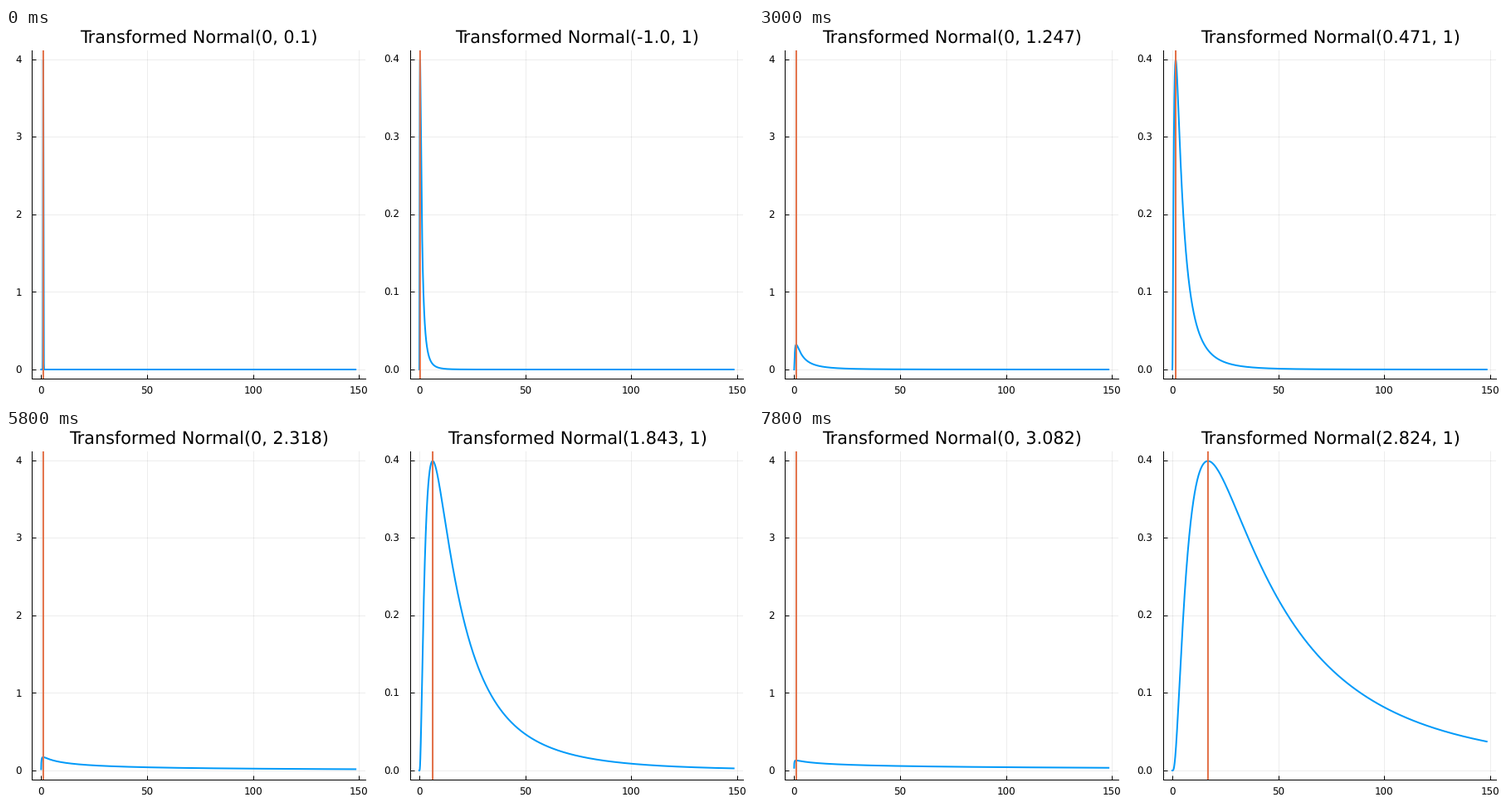
A matplotlib script that plays this animation: 900x450 px, repeating every 8000 ms.

```python
import numpy as np
import matplotlib.pyplot as plt
from matplotlib.animation import FuncAnimation

W, H, DPI = 900, 450, 100
PT = 72 / DPI                      # points per pixel
STEPS, FRAMES, INTERVAL = 51, 40, 200
TICK, TITLE = 11.9, 20.8           # font sizes in pixels
DIGIT, DOT = 0.636, 0.318          # glyph advances in em
BLUE, ORANGE = "#009af9", "#e26f46"

plt.rcParams.update({"font.family": "DejaVu Sans", "text.hinting": "no_hinting"})

t = np.linspace(-5, 5, 1501)
x = np.exp(t)
pad = 0.03 * (x[-1] - x[0])

fig = plt.figure(figsize=(W / DPI, H / DPI), dpi=DPI, facecolor="white")


def normal_pdf(mu, sigma):
    return np.exp(-0.5 * ((t - mu) / sigma) ** 2) / (sigma * np.sqrt(2 * np.pi))


def put(px, py, text, size, **kw):
    return fig.text(px / W, 1 - py / H, text, fontsize=size * PT,
                    va="baseline", **kw)


def advance(label):
    return TICK * sum(DOT if c == "." else DIGIT for c in label)


class Panel:
    left_to_right, top, bottom = 401.5, 27.4, 423.2

    def __init__(self, left, peak, yticks):
        width, height = self.left_to_right, self.bottom - self.top
        ax = fig.add_axes([left / W, 1 - self.bottom / H, width / W, height / H])
        ax.set_xlim(x[0] - pad, x[-1] + pad)
        ax.set_ylim(-0.03 * peak, 1.03 * peak)
        ax.set_xticks([0, 50, 100, 150])
        ax.set_yticks([float(s) for s in yticks])
        ax.tick_params(direction="in", length=5 * PT, width=PT,
                       labelbottom=False, labelleft=False)
        ax.set_axisbelow(True)
        ax.grid(color="black", alpha=0.07, linewidth=PT)
        ax.spines[["top", "right"]].set_visible(False)
        ax.spines[["left", "bottom"]].set_linewidth(PT)

        for v in (0, 50, 100, 150):
            label = str(v)
            px = left + width * (v - x[0] + pad) / (x[-1] - x[0] + 2 * pad)
            put(px - advance(label) / 2, 441.5, label, TICK)
        for label in yticks:
            frac = (float(label) / peak + 0.03) / 1.06
            py = self.bottom - height * frac
            put(left - 12.2 - advance(label), py + 4.4, label, TICK)

        self.curve, = ax.plot([], [], color=BLUE, lw=2 * PT)
        self.mode = ax.axvline(1, color=ORANGE, lw=2 * PT, snap=False)
        self.title = put(left + width / 2 + 0.9, 18.5, "", TITLE, ha="center")

    def show(self, mu, sigma, args):
        self.curve.set_data(x, normal_pdf(mu, sigma))
        self.mode.set_xdata([np.exp(mu)] * 2)
        self.title.set_text(f"Transformed Normal({args})")


PEAK = 1 / np.sqrt(2 * np.pi)
spread = Panel(31.0, 10 * PEAK, ["0", "1", "2", "3", "4"])
shift = Panel(486.6, PEAK, ["0.0", "0.1", "0.2", "0.3", "0.4"])


def update(i):
    sigma = 0.1 + 3.9 * i / STEPS
    mu = -1 + 5 * i / STEPS
    spread.show(0, sigma, f"0, {round(sigma, 3)}")
    shift.show(mu, 1, f"{round(mu, 3)}, 1")
    return []


anim = FuncAnimation(fig, update, frames=FRAMES, interval=INTERVAL,
                     repeat=True, repeat_delay=0)
plt.show()
```
